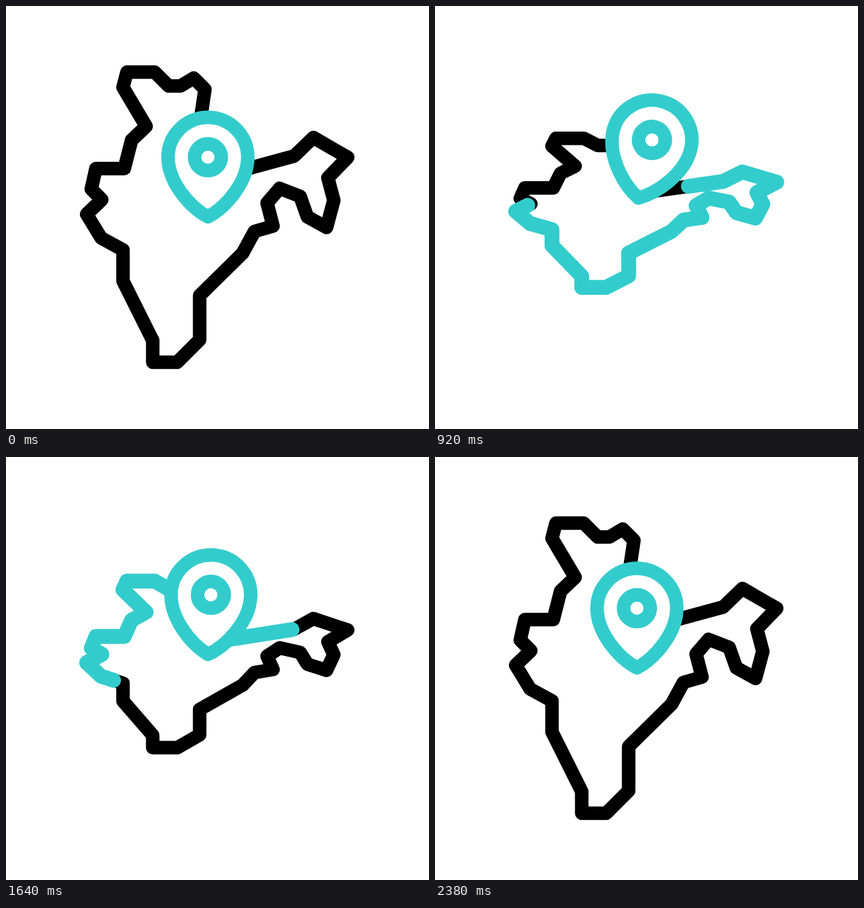
Animation of 640 by 640 pixels, one loop 2.4 s. Source, as an HTML page:

```html
<!DOCTYPE html>
<html lang="en">
<head>
<meta charset="utf-8">
<title>Map pin</title>
<style>
  html, body { margin: 0; width: 100%; height: 100%; overflow: hidden; background: #fff; }
  svg { display: block; width: 100%; height: 100%; }
  path, circle { fill: none; stroke-width: 20.5; stroke-linecap: round; stroke-linejoin: round; }
  #land { stroke: #000; }
  #trail { stroke: #33cccc; stroke-width: 22.5; }
  #pin * { stroke: #33cccc; }
  #pin path { fill: #fff; }
</style>
</head>
<body>
<svg viewBox="0 0 640 640">
  <path id="land" d="M337 254L436 227 465 199 517 229 487 260 496 294 485 335 456 319
    445 288 414 276 395 298 404 333 376 341 358 374 293 438 293 505 259 539 222 539
    222 506 177 416 177 369 144 351 122 315 145 293 129 277 136 246 179 246 190 203
    212 182 177 123 183 100 225 100 246 121 264 121 284 109 301 126 293 180Z"/>
  <path id="trail" pathLength="1000"/>
  <g id="pin">
    <path d="M305.5 319C279 305 245.2 267 245.2 228.8A60.3 60.3 0 0 1 365.8 228.8C365.8 267 332 305 305.5 319Z"/>
    <circle cx="305.5" cy="228.8" r="20.2"/>
  </g>
</svg>
<script>
const LOOP = 2400, END = 2380, HALF = END / 2;
const MID_Y = 306, SQUASH = .507;
const HOP = 710, HOPS = 3;
const SWING = 430, tilts = [0, -15, 14.3, -7, 3.5, 0];

const $ = id => document.getElementById(id);
const land = $('land'), trail = $('trail'), pin = $('pin');
const outline = land.getAttribute('d');

const smooth = x => {
  x = Math.min(1, Math.max(0, x));
  return x * x * (3 - 2 * x);
};

// cubic-bezier(.775, 0, .235, 1), solved by bisection
function strong(x) {
  let lo = 0, hi = 1;
  for (let i = 0; i < 24; i++) {
    const u = (lo + hi) / 2, v = 1 - u;
    if (3 * u * v * (.775 * v + .235 * u) + u * u * u < x) lo = u; else hi = u;
  }
  return smooth(lo);
}

// Flattens the map towards its middle, then lets it grow back
function squashed(t) {
  const k = t < HALF ? strong(t / HALF) : 1 - strong(t / HALF - 1);
  const scale = 1 - SQUASH * k;
  return outline.replace(/(\d+) (\d+)/g, (_, x, y) =>
    x + ' ' + (MID_Y + (y - MID_Y) * scale).toFixed(2));
}

// Each hop is lower than the one before
function lift(t) {
  const n = Math.floor(t / HOP), phase = t / HOP - n;
  return n < HOPS ? (60 - 15 * n) * smooth(1 - Math.abs(2 * phase - 1)) : 0;
}

function tilt(t) {
  const i = Math.floor(t / SWING), a = tilts[i] || 0, b = tilts[i + 1] || 0;
  return a + (b - a) * smooth(t / SWING - i);
}

function draw(now) {
  const t = Math.min(now % LOOP, END);

  const d = squashed(t);
  land.setAttribute('d', d);
  trail.setAttribute('d', d);

  const shift = .11 * smooth(t / END) - .008;
  const head = smooth(t / 1550), tail = smooth((t - 830) / (END - 830));
  const len = 1000 * (head - tail);
  trail.style.display = len > .5 ? '' : 'none';
  trail.style.strokeDasharray = `${len} ${1000 - len}`;
  trail.style.strokeDashoffset = -1000 * (tail + shift);

  pin.setAttribute('transform', `translate(0 ${-lift(t)}) rotate(${tilt(t)} 305.5 329)`);
}

const start = performance.now();
function tick() {
  draw(performance.now() - start);
  requestAnimationFrame(tick);
}
tick();
</script>
</body>
</html>
```
